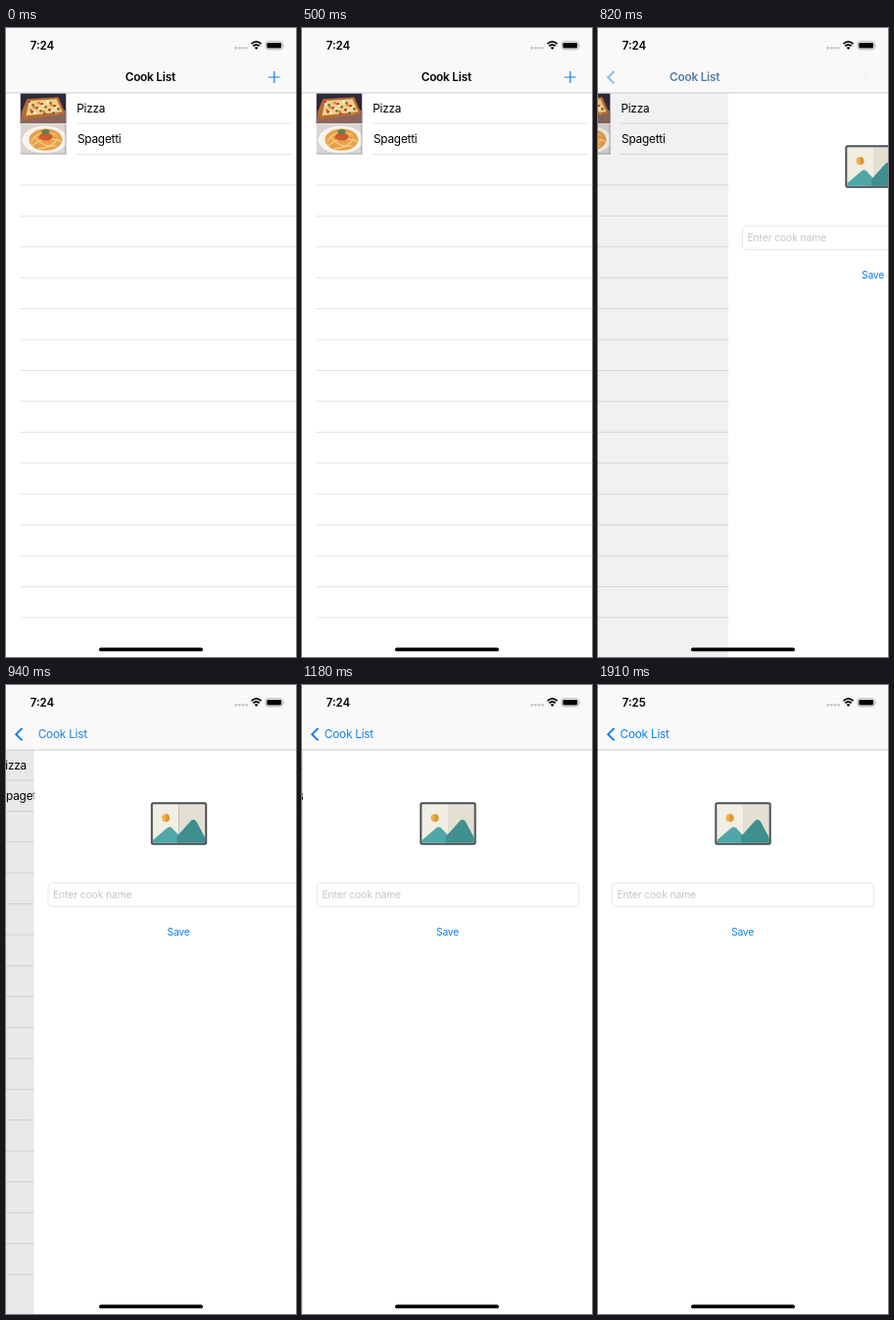
Write an HTML page that moves like this. It is 296 by 640 pixels and loops after 8000 ms.

```html
<!DOCTYPE html>
<html lang="en">
<head>
<meta charset="utf-8">
<style>
html, body { margin: 0; width: 100%; height: 100%; overflow: hidden; background: #fff; }
svg { display: block; width: 296px; height: 640px; }
text { font: 11.8px Inter, Roboto, sans-serif; letter-spacing: -.22px; }
.small { font-size: 10.3px; }
.rows path { stroke: #dedede; stroke-width: .8; }
</style>
</head>
<body>
<svg viewBox="0 0 296 640">
  <defs>
    <clipPath id="thumb"><rect width="47" height="31"/></clipPath>
    <clipPath id="frame"><rect x="121.3" y="121.3" width="53.4" height="39.4" rx="1"/></clipPath>
  </defs>

  <g id="list">
    <rect width="296" height="640" fill="#fff"/>
    <g id="rows" class="rows"></g>
    <g transform="translate(14.5 66.3)" clip-path="url(#thumb)">
      <rect width="47" height="31" fill="#30283a"/>
      <path d="M0 22L47 17V31H0Z" fill="#8a675c"/>
      <path d="M7 6L39 4L46 21L4 27L1 20Z" fill="#b86a35"/>
      <path d="M9 8L37 6L43 19L6 23Z" fill="#efd18b"/>
      <g id="toppings"></g>
    </g>
    <g transform="translate(14.5 97.6)" clip-path="url(#thumb)">
      <rect width="47" height="31" fill="#d9d4d2"/>
      <ellipse cx="25" cy="16" rx="23" ry="14" fill="#f7f3ee"/>
      <ellipse cx="26" cy="16" rx="17" ry="11" fill="#e8a04c"/>
      <g fill="none" stroke="#f5cd7c" stroke-width="1.3">
        <path d="M11 18Q19 5 37 11M12 22Q27 11 42 18M18 25Q33 25 38 15M14 13Q24 25 37 22"/>
      </g>
      <ellipse cx="26" cy="13" rx="7" ry="4" fill="#cf5a2d"/>
      <ellipse cx="26" cy="8" rx="4" ry="2.6" fill="#648043"/>
      <path d="M0 30.6H47M46.6 0V31" stroke="#777" stroke-width=".8"/>
    </g>
    <text x="72.3" y="85.8">Pizza</text>
    <text x="73" y="117.2">Spagetti</text>
    <rect id="dim" width="296" height="640"/>
  </g>

  <g id="page">
    <rect width="296" height="640" fill="#fff"/>
    <rect x="119.3" y="119.3" width="57.4" height="43.4" rx="2.5" fill="#4b5056"/>
    <g clip-path="url(#frame)">
      <rect x="120" y="120" width="28" height="42" fill="#f1eee3"/>
      <rect x="148" y="120" width="28" height="42" fill="#e3dfd3"/>
      <circle cx="134.5" cy="135.3" r="4" fill="#efb04a"/>
      <path d="M134.5 131.3a4 4 0 0 1 0 8Z" fill="#d99a37"/>
      <path d="M120 159L136 145.5Q138.500 143.500 141 145.500L148 153V162H120Z" fill="#4fa7a8"/>
      <path d="M146 154L160 138.500Q163 135.500 166 139L176 158V162H146Z" fill="#3e8f8e"/>
    </g>
    <rect x="14.5" y="201.5" width="267" height="24" rx="3.5" fill="#fff" stroke="#e4e4e4" stroke-width=".8"/>
    <text class="small" x="19.5" y="217.3" fill="#c5c5c7" style="letter-spacing:-.1px">Enter cook name</text>
    <text class="small" x="147.5" y="254.8" fill="#107ff0" text-anchor="middle">Save</text>
  </g>

  <rect width="296" height="66" fill="#f9f9f9"/>
  <path d="M0 66H296" stroke="#c9c9c9" stroke-width=".9"/>
  <text id="clock" x="24.7" y="22" font-weight="600" style="font-size:11.5px;font-weight:600;letter-spacing:0"></text>
  <g fill="#c4c4c6">
    <circle cx="234.700" cy="20.300" r="1.4"/><circle cx="238.300" cy="20.300" r="1.4"/>
    <circle cx="241.900" cy="20.300" r="1.4"/><circle cx="245.500" cy="20.300" r="1.4"/>
  </g>
  <path d="M250.500 16.200Q255.500 11.600 260.500 16.200M252.300 18.400Q255.500 15.700 258.700 18.400" fill="none" stroke="#000" stroke-width="1.8"/>
  <path d="M253.600 19.900Q255.500 18.400 257.400 19.900L255.500 21.900Z"/>
  <rect x="265" y="13.600" width="17.400" height="8.300" rx="2.300" fill="none" stroke="#a5a5a5" stroke-width=".8"/>
  <rect x="266.300" y="14.900" width="14.800" height="5.700" rx="1.300"/>
  <path d="M283.400 16.300q1.400 1.400 0 2.900Z" fill="#a5a5a5"/>

  <path id="back" d="M16.500 44L10.200 50.200L16.500 56.400" fill="none" stroke="#107ff0" stroke-width="1.9"/>
  <text id="title" y="54.300"></text>
  <path id="plus" d="M267.800 50H279.800M273.800 44V56" stroke="#107ff0" stroke-width="1.2"/>
  <rect x="95" y="630.500" width="106" height="3.800" rx="1.900"/>
</svg>

<script>
const $ = id => document.getElementById(id);
const LOOP = 8000, WIDTH = 296;

$('rows').innerHTML = Array.from({ length: 17 }, (_, i) => {
  const y = 97 + i * 31.43;
  return `<path d="M${i < 2 ? 72 : 14} ${y}H${i < 2 ? 292 : 296}"/>`;
}).join('');

const colors = ['#b83c2b', '#fff2cf', '#77733a', '#d9823c'];
$('toppings').innerHTML = Array.from({ length: 26 }, (_, i) =>
  `<circle cx="${9 + i * 11 % 31}" cy="${9 + i * 7 % 13}" r="1.4" fill="${colors[i % 4]}"/>`
).join('');

// Held poses of the push transition
const poses = [
  { at: 0, x: 296, titleX: 121.7, back: 0, plus: 1, color: '#000' },
  { at: 710, x: 296, titleX: 121.7, back: 0, plus: .25, color: '#000' },
  { at: 820, x: 133, titleX: 73, back: .5, plus: .05, color: '#587a9f' },
  { at: 940, x: 28.5, titleX: 32.7, back: 1, plus: 0, color: '#2382e0' },
  { at: 1060, x: 6, titleX: 24.7, back: 1, plus: 0, color: '#107ff0' },
  { at: 1180, x: 1, titleX: 22.8, back: 1, plus: 0, color: '#107ff0' },
  { at: 1910, x: 0, titleX: 22.5, back: 1, plus: 0, color: '#107ff0' }
];

$('title').textContent = 'Cook List';

function draw(now) {
  const t = now % LOOP;
  const pose = poses.findLast(p => p.at <= t);
  const progress = 1 - pose.x / WIDTH;
  $('page').setAttribute('transform', `translate(${pose.x})`);
  $('list').setAttribute('transform', `translate(${-.3 * WIDTH * progress})`);
  $('dim').setAttribute('opacity', .1 * progress);
  $('back').setAttribute('opacity', pose.back);
  $('plus').setAttribute('opacity', pose.plus);
  $('title').setAttribute('x', pose.titleX);
  $('title').style.fill = pose.color;
  $('title').style.fontWeight = progress < .7 ? 600 : 400;
  $('clock').textContent = t < 1910 ? '7:24' : '7:25';
  requestAnimationFrame(draw);
}
requestAnimationFrame(draw);
</script>
</body>
</html>
```
